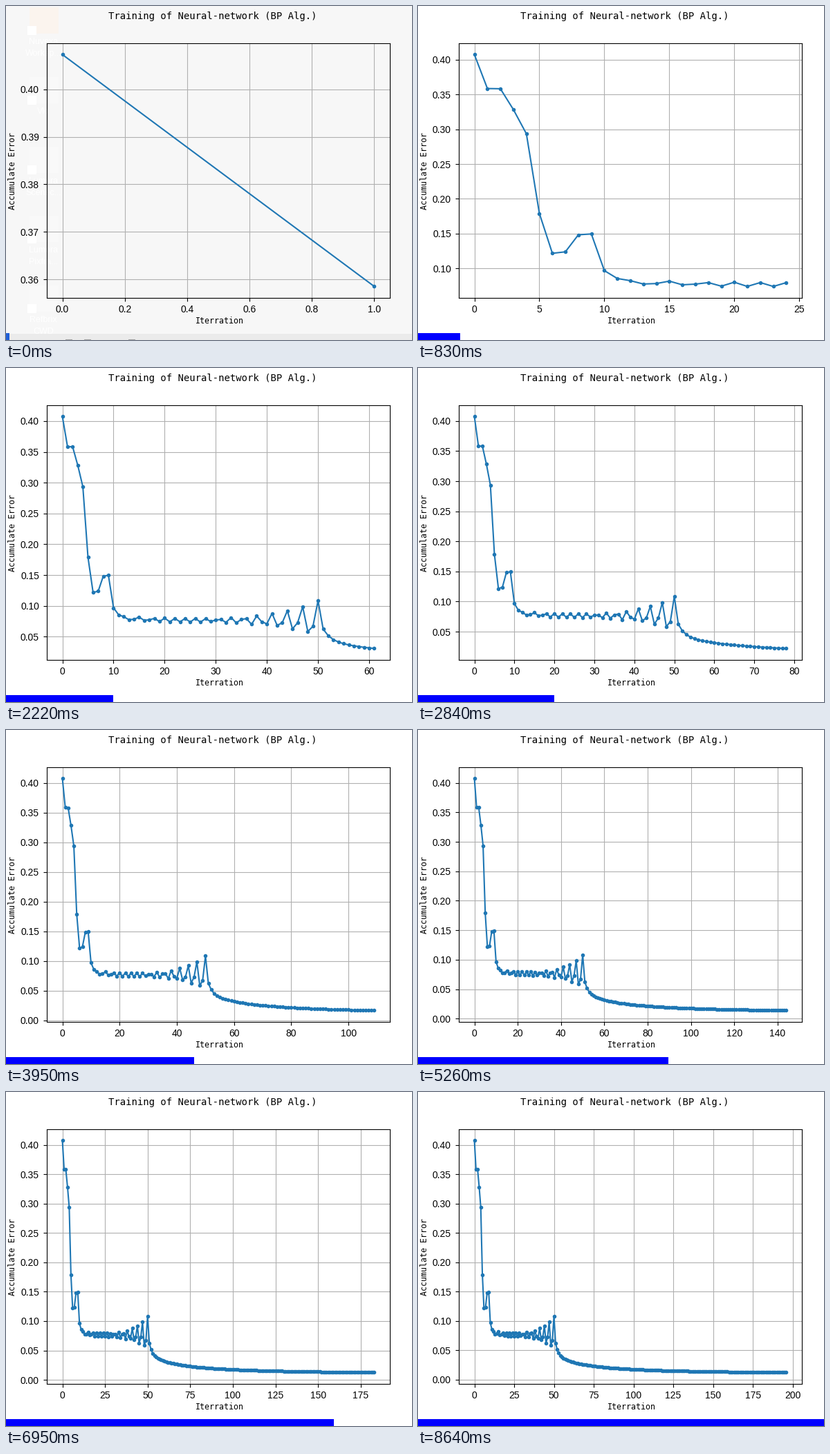
A matplotlib script for the animation above (8.68 s loop, 587 by 484 pixels).

```python
import numpy as np
import matplotlib.pyplot as plt
from matplotlib.animation import FuncAnimation
from matplotlib.patches import Rectangle
from matplotlib.transforms import Affine2D

W, H, DPI = 587, 484, 100
LOOP, STEP = 8680, 40
FRAMES = LOOP // STEP
SHOTS = 125          # screen captures in one loop
LAST = 199           # final training iteration

plt.rcParams["font.family"] = "Liberation Sans"
MONO = "DejaVu Sans Mono"

DROP = [.4073, .3585, .3582, .3283, .2935, .1790, .1217, .1238,
        .1483, .1495, .0968]


def error(n):
    """Steep drop, a plateau with growing swings, then a slow decay."""
    if n < len(DROP):
        return DROP[n]
    if n <= 50:
        # The swings slow down while they grow.
        turns = (np.sqrt(3.35 + 0.2224 * (n - 20)) - 1.83) / 0.1112
        swing = 0.003 + 0.029 * (max(n - 20, 0) / 30) ** 3.5
        base = 0.0765 + 0.006 * np.exp(-(n - 11) / 4)
        return base + swing * np.cos(2 * np.pi * turns)
    return (0.0086 + 1 / (43.3 + 1.7 * (n - 60))
            + 0.018 * np.exp((51 - n) / 1.5))


def iteration(shot):
    """Training runs steadily, slows a little and stops at the end."""
    return min(LAST, round(1 + 1.89 * shot - 7 * (shot / 100) ** 8))


steps = np.arange(LAST + 1)
errors = np.array([error(n) for n in steps])

fig = plt.figure(figsize=((W + 0.01) / DPI, (H + 0.01) / DPI), dpi=DPI,
                 facecolor="white")
px = Affine2D().scale(1 / W, -1 / H).translate(0, 1) + fig.transFigure


def box(x, y, w, h, color, z):
    return fig.add_artist(Rectangle((x, y), w, h, fc=color, ec="none",
                                    transform=px, zorder=z))


def label(x, y, text, size, **kw):
    return fig.text(x, y, text, fontsize=size, ha="center", va="baseline",
                    transform=px, **kw)


# Chart
LEFT, TOP, AW, AH = 59, 53.6, 496, 369.6
ax = fig.add_axes([LEFT / W, 1 - (TOP + AH) / H, AW / W, AH / H])
ax.patch.set_visible(False)
ax.grid(True)
ax.tick_params(axis="x", pad=3.8)
ax.tick_params(axis="y", pad=4.5)
line, = ax.plot([], [], marker=".", color="#1f77b4")

label(298.7, 18.7, "Training of Neural-network (BP Alg.)", 10, family=MONO)
label(308.5, 460, "Iterration", 8.33, family=MONO)
label(13, 239, "Accumulate Error", 8.33, family=MONO, rotation=90,
      rotation_mode="anchor")
bar = box(0, 474, 0, 10, "#0000ff", 5)

# Desktop shining through the window while it fades in
ghost = [box(0, 0, W, H, "#f7f7f7", -9),
         box(0, 475, W, 9, "#ebebeb", -8)]
ICONS = ["Nuvexa\nWorksp...", "Vlo\n", "Lumora\nScenec...",
         "Lumora\nPixfra...", "Refbrix\nCWD"]
for k, name in enumerate(ICONS):
    y = 2 + 100.8 * k
    ghost.append(box(34, y, 42, 38, "#f9f9f9" if k else "#fbf4ee", -7))
    ghost.append(box(31, y + 27, 13, 13, "#ffffff", -6))
    for row, text in enumerate(name.split("\n")):
        ghost.append(label(54, y + 53 + 17 * row, text, 9, color="white",
                           zorder=-6))
for x in (86, 113, 177):
    ghost.append(box(x, 483, 10, 1, "#a0a0a0", -6))


def update(i):
    shot = min((i + 1) * SHOTS // FRAMES, SHOTS - 1)
    n = iteration(shot) + 1
    line.set_data(steps[:n], errors[:n])
    ax.relim()
    ax.autoscale_view()
    bar.set_width(W * (shot + 1) / SHOTS)
    bar.set_facecolor("#0000ff" if shot else "#1f5fd8")
    for g in ghost:
        g.set_visible(shot == 0)
    return [line, bar, *ghost]


anim = FuncAnimation(fig, update, frames=FRAMES, interval=STEP,
                     init_func=lambda: update(0), repeat=True,
                     repeat_delay=0, blit=False)
plt.show()
```
